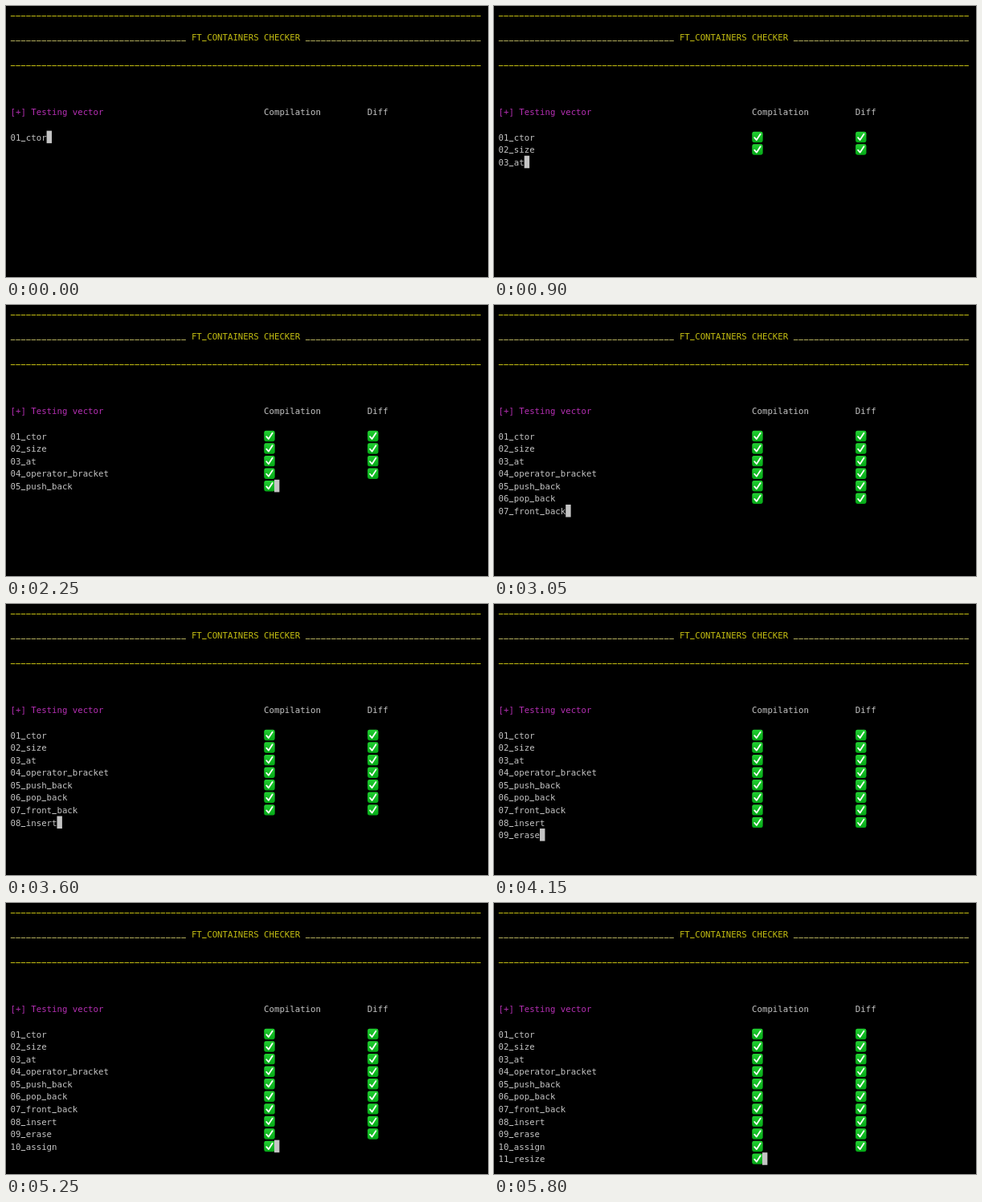
An HTML page with a canvas for the animation above (5.85 s loop, 600 by 338 pixels).

```html
<!DOCTYPE html>
<html lang="en">
<head>
<meta charset="utf-8">
<title>Container checker</title>
<style>
  html, body { margin: 0; width: 100%; height: 100%; overflow: hidden; background: #000; }
  canvas { display: block; }
</style>
</head>
<body>
<canvas id="term" width="600" height="338"></canvas>
<script>
const ctx = document.getElementById('term').getContext('2d');
const LEFT = 5.5, CELL = 6.44, ROW = 15.56;
const YELLOW = '#c3bd12', PALE = '#b3ae5c', MAGENTA = '#b52fb3', WHITE = '#c4c4c4';
const COMPILE_COL = 49, DIFF_COL = 69, FIRST_ROW = 10;
const LOOP = 5850, TICK = 50, PERIOD = 560, LEAD = 330, COMPILE_TIME = 340;
const tests = ['ctor', 'size', 'at', 'operator_bracket', 'push_back', 'pop_back',
  'front_back', 'insert', 'erase', 'assign', 'resize']
  .map((name, i) => String(i + 1).padStart(2, '0') + '_' + name);

const colX = col => LEFT + col * CELL;

// Underscores sit close under the baseline, so they are drawn as bars.
function write(text, col, row, color) {
  const base = row * ROW + 12;
  ctx.fillStyle = color;
  [...text].forEach((ch, i) => {
    const x = colX(col + i);
    if (ch === '_') ctx.fillRect(x + 0.3, Math.round(base), CELL - 0.9, 1);
    else ctx.fillText(ch, x, base);
  });
}

function check(col, row) {
  const x = colX(col) + 0.2, y = row * ROW + 1.2;
  const fill = ctx.createLinearGradient(0, y, 0, y + 13.4);
  fill.addColorStop(0, '#22cf32');
  fill.addColorStop(1, '#04a816');
  ctx.fillStyle = fill;
  ctx.beginPath();
  ctx.roundRect(x, y, 13.4, 13.4, 2.4);
  ctx.fill();
  ctx.strokeStyle = '#fff';
  ctx.lineWidth = 1.8;
  ctx.beginPath();
  ctx.moveTo(x + 3, y + 7.3);
  ctx.lineTo(x + 5.6, y + 10.3);
  ctx.lineTo(x + 10.4, y + 2.9);
  ctx.stroke();
}

function draw(time) {
  const t = Math.floor(time % LOOP / TICK) * TICK + LEAD;
  const current = Math.min(tests.length - 1, Math.floor(t / PERIOD));
  const compiled = t - current * PERIOD >= COMPILE_TIME;

  ctx.fillStyle = '#000';
  ctx.fillRect(0, 0, 600, 338);
  ctx.font = '10.7px "DejaVu Sans Mono", monospace';
  ctx.lineCap = ctx.lineJoin = 'round';

  const rule = '_'.repeat(91), side = '_'.repeat(34);
  write(rule, 0, 0, YELLOW);
  write(side, 0, 2, PALE);
  write('FT_CONTAINERS CHECKER', 35, 2, YELLOW);
  write(side, 57, 2, PALE);
  write(rule, 0, 4, YELLOW);
  write('[+] Testing vector', 0, 8, MAGENTA);
  write('Compilation', COMPILE_COL, 8, WHITE);
  write('Diff', DIFF_COL, 8, WHITE);

  for (let i = 0; i <= current; i++) {
    const row = FIRST_ROW + i;
    write(tests[i], 0, row, WHITE);
    if (i < current || compiled) check(COMPILE_COL, row);
    if (i < current) check(DIFF_COL, row);
  }

  const cursor = compiled ? COMPILE_COL + 2 : tests[current].length;
  ctx.fillStyle = WHITE;
  ctx.fillRect(colX(cursor), (FIRST_ROW + current) * ROW, CELL, ROW);
}

function frame() {
  draw(performance.now());
  requestAnimationFrame(frame);
}
frame();
</script>
</body>
</html>
```
